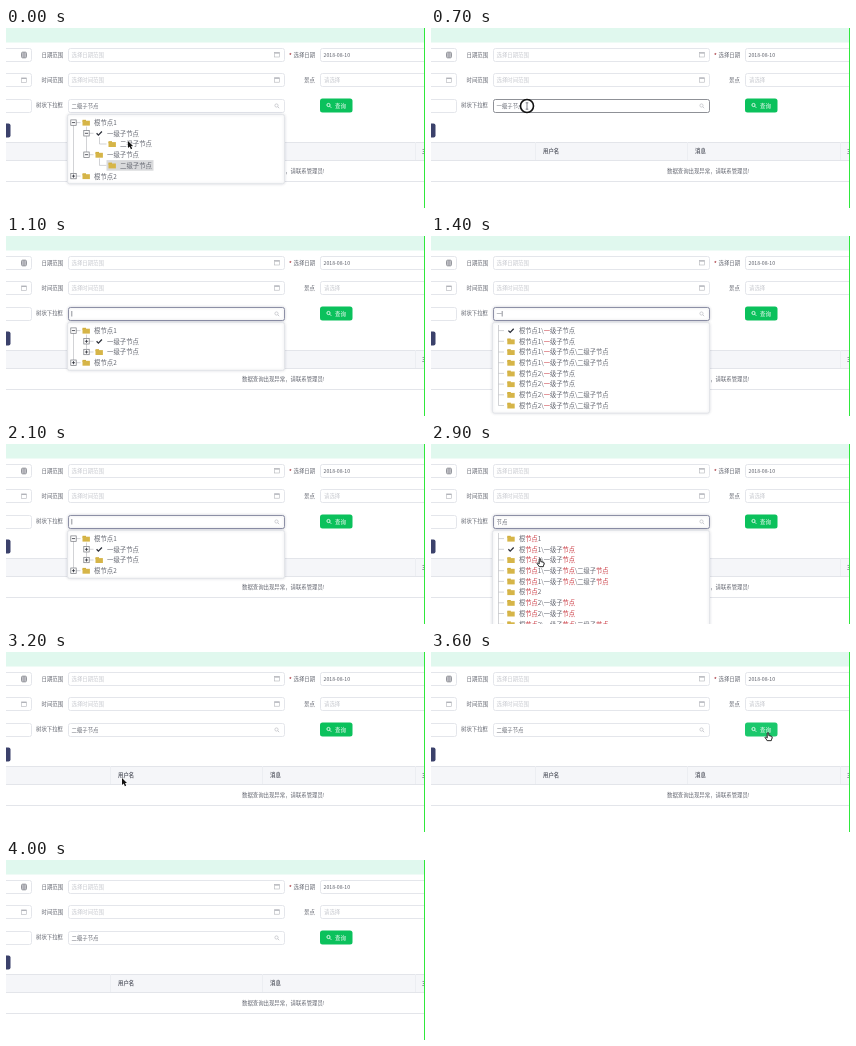
These frames come from a looping animation (419x180 px, 4.1 s). An HTML page with a canvas:

```html
<!DOCTYPE html>
<html lang="zh">
<head>
<meta charset="utf-8">
<style>
html, body { margin: 0; width: 419px; height: 180px; overflow: hidden; background: #fff; }
canvas { display: block; width: 419px; height: 180px; }
</style>
</head>
<body>
<canvas id="stage"></canvas>
<script>
const canvas = document.getElementById('stage');
const c = canvas.getContext('2d');
const ratio = window.devicePixelRatio || 1;
canvas.width = 419 * ratio;
canvas.height = 180 * ratio;

const LOOP = 4100, STEP = 100, ROW = 10.7, TOP = 94.6;
const INK = '#62656f', PALE = '#c6c8ce', RED = '#c9363e', DARK = '#2b2e38', RULE = '#b4b6bb';
const FONT = '"Noto Sans CJK SC", "Noto Sans", sans-serif';
const CHILD = '一级子节点', GRAND = '二级子节点';

// Tree rows: depth, label, open / closed / leaf, checked, highlighted
const fullTree = [
  [0, '根节点1', '-'], [1, CHILD, '-', true], [2, GRAND, ''],
  [1, CHILD, '-'], [2, GRAND, '', false, true], [0, '根节点2', '+']
];
const foldedTree = [[0, '根节点1', '-'], [1, CHILD, '+', true], [1, CHILD, '+'], [0, '根节点2', '+']];
const paths = ['根节点1', '根节点2'].flatMap(root => {
  const child = root + '\\' + CHILD, grand = child + '\\' + GRAND;
  return [root, child, child, grand, grand];
});

// Start time, input text, panel, input mode
const states = [
  [0, GRAND, fullTree], [400, CHILD, null], [700, CHILD, null, 'hover'],
  [900, CHILD, foldedTree, 'focus'], [1000, '', foldedTree, 'focus'],
  [1200, '一', '一', 'focus'], [2000, '', foldedTree, 'focus'],
  [2200, 'jie', foldedTree, 'focus'], [2400, 'jiedian', foldedTree, 'focus'],
  [2500, '节点', '节点', 'focus'], [3200, GRAND, null]
];
const borders = { hover: '#8f9197', focus: '#8d90a6' };

// Pointer stops: time, x, y, shape used until the next stop
const stops = [
  [0, 122, 113, 'arrow'], [200, 116, 104, 'hand'], [400, 114, 104, 'arrow'],
  [600, 96, 78, 'beam'], [1000, 96, 78, ''], [2600, 150, 150, 'arrow'],
  [2700, 109, 115, 'hand'], [2900, 109, 115, 'hand'], [3000, 116, 126, 'hand'],
  [3200, 116, 126, 'arrow'], [3500, 337, 81, 'hand'], [3800, 337, 81, 'arrow'],
  [4000, 390, 150, '']
];

function text(s, x, y, size = 5.4, color = INK, weight = 500) {
  c.font = `${weight} ${size}px ${FONT}`;
  c.fillStyle = color;
  c.fillText(s, x, y);
  return c.measureText(s).width;
}

function rect(x, y, w, h, color) {
  c.fillStyle = color;
  c.fillRect(x, y, w, h);
}

function line(color, width, ...points) {
  c.strokeStyle = color;
  c.lineWidth = width;
  c.beginPath();
  for (const [x, y] of points) c.lineTo(x, y);
  c.stroke();
}

function box(x, y, w, h, fill, border, radius = 2) {
  c.beginPath();
  c.roundRect(x, y, w, h, radius);
  c.fillStyle = fill;
  c.fill();
  if (border) {
    c.strokeStyle = border;
    c.lineWidth = 1;
    c.stroke();
  }
}

function raised(strength, paint) {
  c.save();
  c.shadowColor = `rgba(50,55,80,${strength})`;
  c.shadowBlur = 3 * ratio;
  paint();
  c.restore();
}

function circle(x, y, r, color, width, fill) {
  c.strokeStyle = color;
  c.lineWidth = width;
  c.beginPath();
  c.arc(x, y, r, 0, 7);
  if (fill) {
    c.fillStyle = fill;
    c.fill();
  }
  c.stroke();
}

function calendar(x, y, color = '#b2b4ba') {
  c.strokeStyle = color;
  c.lineWidth = 0.6;
  c.strokeRect(x - 2.5, y - 2, 5, 4.4);
  line(color, 1.2, [x - 2.5, y - 1.6], [x + 2.5, y - 1.6]);
}

function lens(x, y, color) {
  circle(x - 0.5, y - 0.5, 1.6, color, 0.8);
  line(color, 0.9, [x + 0.8, y + 0.8], [x + 2.2, y + 2.2]);
}

function folder(x, y) {
  rect(x - 3.7, y - 2.8, 3.5, 2, '#cfac3a');
  rect(x - 3.7, y - 1.9, 7.4, 4.9, '#d6b548');
}

function icon(x, y, checked) {
  if (checked) line(DARK, 1.3, [x - 2.6, y], [x - 0.8, y + 1.8], [x + 2.7, y - 1.8]);
  else folder(x, y);
}

function form(value, mode, caret) {
  rect(0, 0, 419, 14.5, '#e0f8ee');
  [20, 45, 71].forEach(y => {
    box(-10, y + .5, 35.5, 13, '#fff', '#e4e6eb');
    box(62.5, y + .5, 216, 13, '#fff', '#e4e6eb');
    if (y < 71) box(314.5, y + .5, 120, 13, '#fff', '#e4e6eb');
  });
  box(15.6, 24.2, 4.8, 5.6, '#e2e3e6', '#8a8c93', 1);
  for (const y of [26, 28]) line('#8a8c93', .7, [16, y], [20, y]);
  line('#8a8c93', .7, [18, 24.5], [18, 29.5]);
  calendar(18, 52);
  [['日期范围', 26.6], ['时间范围', 51.8]].forEach(([label, y]) => {
    text(label, 35.5, y);
    text('选择' + label, 65.5, y, 5.4, PALE);
    calendar(271, y);
  });
  text('*', 283, 27, 5.4, '#a8383f', 700);
  text('选择日期', 287.5, 26.6);
  text('2018-08-10', 317.5, 26.6, 5.2);
  text('景点', 298, 51.8);
  text('请选择', 318, 51.8, 5.4, PALE);
  text('树状下拉框', 30, 77.4);

  const outline = () => box(62.5, 71.5, 216, 13, '#fff', borders[mode]);
  if (mode === 'focus') raised(.2, outline);
  else if (mode) outline();
  const w = text(value, 65.5, 77.6);
  if (mode === 'focus' && caret) line(INK, .7, [65.8 + w, 75], [65.8 + w, 80.5]);
  lens(271, 78, '#c3c5ca');
}

function page(hover) {
  box(314, 70.5, 32.5, 14, hover ? '#1bc86c' : '#0bc15c', null, 2.5);
  lens(323, 77.5, '#fff');
  text('查询', 329, 77.5, 5.4, '#fff');
  box(-5, 95.5, 9.5, 14, '#3b416b');
  rect(0, 114, 419, 18.5, '#f5f6f9');
  for (const y of [114.5, 132.5, 153.5]) line('#e3e5ea', 1, [0, y], [419, y]);
  for (const x of [104.5, 256.5, 409.5]) line('#eceef2', 1, [x, 114], [x, 132]);
  text('用户名', 112, 123.4, 5.4, INK, 700);
  text('消息', 264, 123.4, 5.4, INK, 700);
  text('主', 416, 123.4, 5.4, INK, 700);
  text('数据查询出现异常，请联系管理员!', 236, 142.5);
}

function panel(rowCount) {
  raised(.15, () => box(61.5, 86.5, 217, rowCount * ROW + 5, '#fff', '#e3e5e9'));
}

function tree(rows) {
  panel(rows.length);
  const last = TOP + (rows.length - 1) * ROW;
  line(RULE, .6, [67.5, TOP], [67.5, last]);
  line(RULE, .6, [80.5, TOP + 4], [80.5, last - ROW * (rows.length > 4 ? 2 : 1)]);
  rows.forEach(([depth, label, fold, checked, lit], i) => {
    const x = 67.5 + depth * 13, y = TOP + i * ROW;
    line(RULE, .6, [x, y], [x + 7, y]);
    if (fold) {
      rect(x - 2.7, y - 2.7, 5.4, 5.4, '#fff');
      c.strokeStyle = '#73767c';
      c.lineWidth = .7;
      c.strokeRect(x - 2.7, y - 2.7, 5.4, 5.4);
      line(DARK, .8, [x - 1.6, y], [x + 1.6, y]);
      if (fold === '+') line(DARK, .8, [x, y - 1.6], [x, y + 1.6]);
    } else {
      line(RULE, .6, [x, y - 7], [x, y]);
    }
    if (lit) rect(x + 7, y - 5.3, 47, 10.6, '#d9dadc');
    icon(x + 12.7, y, checked);
    text(label, x + 20.5, y, 6.4);
  });
}

function results(query) {
  const rows = paths.filter(p => p.includes(query));
  const checked = rows.findIndex(p => p.includes(CHILD));
  panel(rows.length);
  line(RULE, .6, [67.5, 89], [67.5, TOP + (rows.length - 1) * ROW]);
  rows.forEach((path, i) => {
    const y = TOP + i * ROW;
    let x = 88;
    line(RULE, .6, [67.5, y], [73, y]);
    icon(80, y, i === checked);
    for (const part of path.split(new RegExp(`(${query})`)))
      x += text(part, x, y, 6.25, part === query ? RED : INK);
  });
}

function pointer(t) {
  const i = stops.findLastIndex(s => s[0] <= t);
  const [t0, x0, y0, shape] = stops[i];
  if (!shape) return;
  if (shape === 'beam') {
    if (t >= 700 && t < 900) circle(x0, y0, 6.5, '#111', 1.6, '#fff');
    line(INK, .8, [x0, y0 - 3.2], [x0, y0 + 3.2]);
    for (const d of [-3.2, 3.2]) line(INK, .8, [x0 - 1.3, y0 + d], [x0 + 1.3, y0 + d]);
    return;
  }
  const [t1, x1, y1] = stops[i + 1];
  const k = (t - t0) / (t1 - t0);
  const arrow = shape === 'arrow';
  const path = new Path2D(arrow
    ? 'M0 0V7L1.7 5.5 2.9 8.2 4.2 7.6 3 5H5Z'
    : 'M-.7 0Q0-.8.7 0V2.6L3.6 3.4Q4.2 3.7 4 5L3.2 7.6H-.8L-2.8 4.6Q-2.5 3.6-1.4 4.4L-.7 4.9Z');
  c.save();
  c.translate(x0 + (x1 - x0) * k, y0 + (y1 - y0) * k);
  c.fillStyle = arrow ? '#111' : '#fff';
  c.strokeStyle = arrow ? '#fff' : '#222';
  c.lineWidth = .8;
  c.stroke(path);
  c.fill(path);
  if (!arrow) c.stroke(path);
  c.restore();
}

function draw(now) {
  const t = Math.floor(now % LOOP / STEP) * STEP;
  const [, value, list, mode] = states.findLast(s => s[0] <= t);
  c.setTransform(ratio, 0, 0, ratio, 0, 0);
  c.textBaseline = 'middle';
  rect(0, 0, 419, 180, '#fff');
  form(value, mode, t % 1000 < 500);
  page(t >= 3500 && t < 3900);
  if (typeof list === 'string') results(list);
  else if (list) tree(list);
  rect(418, 0, 1, 180, '#2fe83c');
  pointer(t);
}

let start;
function tick(now) {
  start ??= now;
  draw(now - start);
  requestAnimationFrame(tick);
}
requestAnimationFrame(tick);
</script>
</body>
</html>
```
